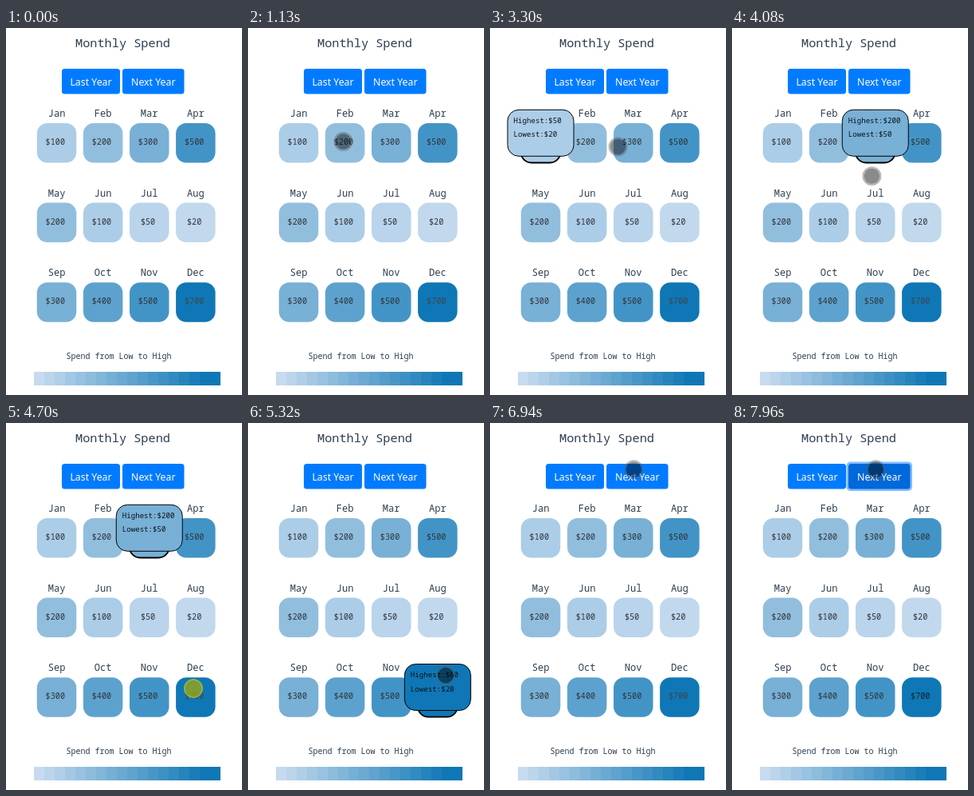
Animation, 296 px wide and 459 px high, one loop 8000 ms. Source, as an HTML page:

```html
<!DOCTYPE html>
<html lang="en">
<head>
<meta charset="utf-8">
<title>Monthly Spend</title>
<style>
  html, body { margin: 0; width: 100%; height: 100%; overflow: hidden; background: #fff; }
  svg { display: block; width: 100vw; height: 100vh; }
  text { font-family: "Noto Sans Mono", monospace; fill: #2c3e50; white-space: pre; }
  .button text { font: 12.3px "Noto Sans", sans-serif; fill: #fff; }
  .value { font-size: 10.2px; fill: #30353b; }
  .tip text { font-size: 9.15px; fill: #0c1218; }
</style>
</head>
<body>
<svg id="stage" viewBox="0 0 296 459"></svg>
<script>
const LOOP = 8000;
const CELL = 49.5;
const stage = document.getElementById('stage');

function add(parent, tag, attrs = {}, content = '') {
  const node = document.createElementNS('http://www.w3.org/2000/svg', tag);
  set(node, attrs);
  node.textContent = content;
  return parent.appendChild(node);
}
function set(node, attrs) {
  for (const name in attrs) node.setAttribute(name, attrs[name]);
}
function label(parent, content, x, y, attrs) {
  return add(parent, 'text', { x, y, 'text-anchor': 'middle', ...attrs }, content);
}
function spendColor(share) {
  const low = [198, 219, 239], high = [15, 119, 181];
  return `rgb(${low.map((c, i) => Math.round(c + (high[i] - c) * share))})`;
}

label(stage, 'Monthly Spend', 146.5, 24, { 'font-size': 15.25 });

function button(content, x, width) {
  const group = add(stage, 'g', { class: 'button' });
  const box = add(group, 'rect', { x, y: 51, width, height: 31.5, rx: 3.5, fill: '#007bff' });
  label(group, content, x + width / 2, 72);
  return box;
}
button('Last Year', 70, 73);
const nextRing = add(stage, 'rect', { x: 143.5, y: 48.5, width: 82.5, height: 36.5, rx: 5, fill: '#80bdff' });
const nextBox = button('Next Year', 146, 77.5);

const months = 'Jan Feb Mar Apr May Jun Jul Aug Sep Oct Nov Dec'.split(' ');
const spend = [100, 200, 300, 500, 200, 100, 50, 20, 300, 400, 500, 700];
const cells = months.map((month, i) => {
  const x = 38.8 + 58.1 * (i % 4);
  const y = 119 + 99.6 * Math.floor(i / 4);
  const mid = x + CELL / 2;
  const fill = spendColor(spend[i] / 700);
  label(stage, month, mid, y - 8, { 'font-size': 12.1 });
  const box = add(stage, 'rect', { x, y, width: CELL, height: CELL, rx: 13, fill });
  const value = label(stage, '$' + spend[i], mid - 1.7, y + 27, { class: 'value' });
  return { x, y, fill, box, value };
});

label(stage, 'Spend from Low to High', 141.5, 414, { 'font-size': 10 });
for (let i = 0; i < 18; i++) {
  add(stage, 'rect', {
    x: 34.5 + 13 * i, y: 430, width: 13, height: 17,
    fill: spendColor(Math.min(1, i / 16)), 'shape-rendering': 'crispEdges'
  });
}

const tip = add(stage, 'g', { class: 'tip' });
const tipBox = add(tip, 'rect', { x: 0.5, y: 0.5, width: 83, height: 58, rx: 14, stroke: '#000', 'stroke-width': 1 });
const highest = add(tip, 'text', { x: 8, y: 17 });
const lowest = add(tip, 'text', { x: 8, y: 34.5 });

const cursor = add(stage, 'g');
const cursorRing = add(cursor, 'circle', { r: 10.9, fill: 'none', 'stroke-width': 2.2 });
const cursorCore = add(cursor, 'circle', { r: 9.8 });

// Pointer moves: first step time, last step time, step count, destination
const moves = [
  [130, 360, 4, 145, 181],
  [590, 750, 3, 124, 94],
  [900, 980, 2, 120, 132],
  [1130, 1130, 1, 119.5, 142],
  [1850, 2070, 4, 56.5, 129.5],
  [2830, 3070, 4, 142.5, 142.5],
  [3220, 3300, 2, 160.5, 148.5],
  [4080, 4380, 5, 235, 332],
  [5250, 5410, 3, 274, 283],
  [5480, 5560, 2, 279, 301],
  [6570, 6940, 6, 180.3, 58.3]
];
// Taps: press, release, then the month opened with its range
const taps = [
  { down: 1360, up: 1530, month: 1, high: 100, low: 10 },
  { down: 2450, up: 2620, month: 0, high: 50, low: 20 },
  { down: 3680, up: 3830, month: 2, high: 200, low: 50 },
  { down: 4700, up: 4850, month: 11, high: 60, low: 20 },
  { down: 6020, up: 6170 },
  { down: 7560, up: 7720 }
];

function pointerAt(t) {
  let x = 234, y = 477;
  for (const [start, end, steps, toX, toY] of moves) {
    if (t < start) break;
    const gap = (end - start) / (steps - 1) || 1;
    const share = t >= end ? 1 : (Math.floor((t - start) / gap) + 1) / steps;
    x += (toX - x) * share;
    y += (toY - y) * share;
  }
  return [x, y];
}

function showTip(open) {
  const shown = open && open.month !== undefined;
  tip.style.display = shown ? '' : 'none';
  cells.forEach((cell, i) => set(cell.box, {
    stroke: shown && i === open.month ? '#000' : 'none', 'stroke-width': 1.8
  }));
  if (!shown) return;
  const cell = cells[open.month];
  set(tip, { transform: `translate(${cell.x + CELL / 2 - 42} ${cell.y - 17.2})` });
  set(tipBox, { fill: cell.fill });
  highest.textContent = 'Highest:$' + open.high;
  lowest.textContent = 'Lowest:$' + open.low;
}

function draw(t) {
  showTip(taps.filter(tap => t >= tap.up).pop());

  const pressed = taps.some(tap => t >= tap.down && t < tap.up);
  set(cursor, { transform: `translate(${pointerAt(t)})` });
  set(cursorRing, { stroke: pressed ? 'rgba(204,209,24,.67)' : 'rgba(90,90,90,.42)' });
  set(cursorCore, { fill: pressed ? 'rgba(172,169,0,.72)' : 'rgba(0,0,0,.46)' });

  const focused = t >= 7720;
  set(nextRing, { opacity: t >= 7810 ? 1 : focused ? 0.5 : 0 });
  set(nextBox, { fill: t >= 7810 ? '#0069d9' : focused ? '#0072ec' : '#007bff' });
  cells[11].value.style.fill = focused ? '#10202e' : '#3f4650';
}

function frame() {
  draw(performance.now() % LOOP);
  requestAnimationFrame(frame);
}
frame();
</script>
</body>
</html>
```
